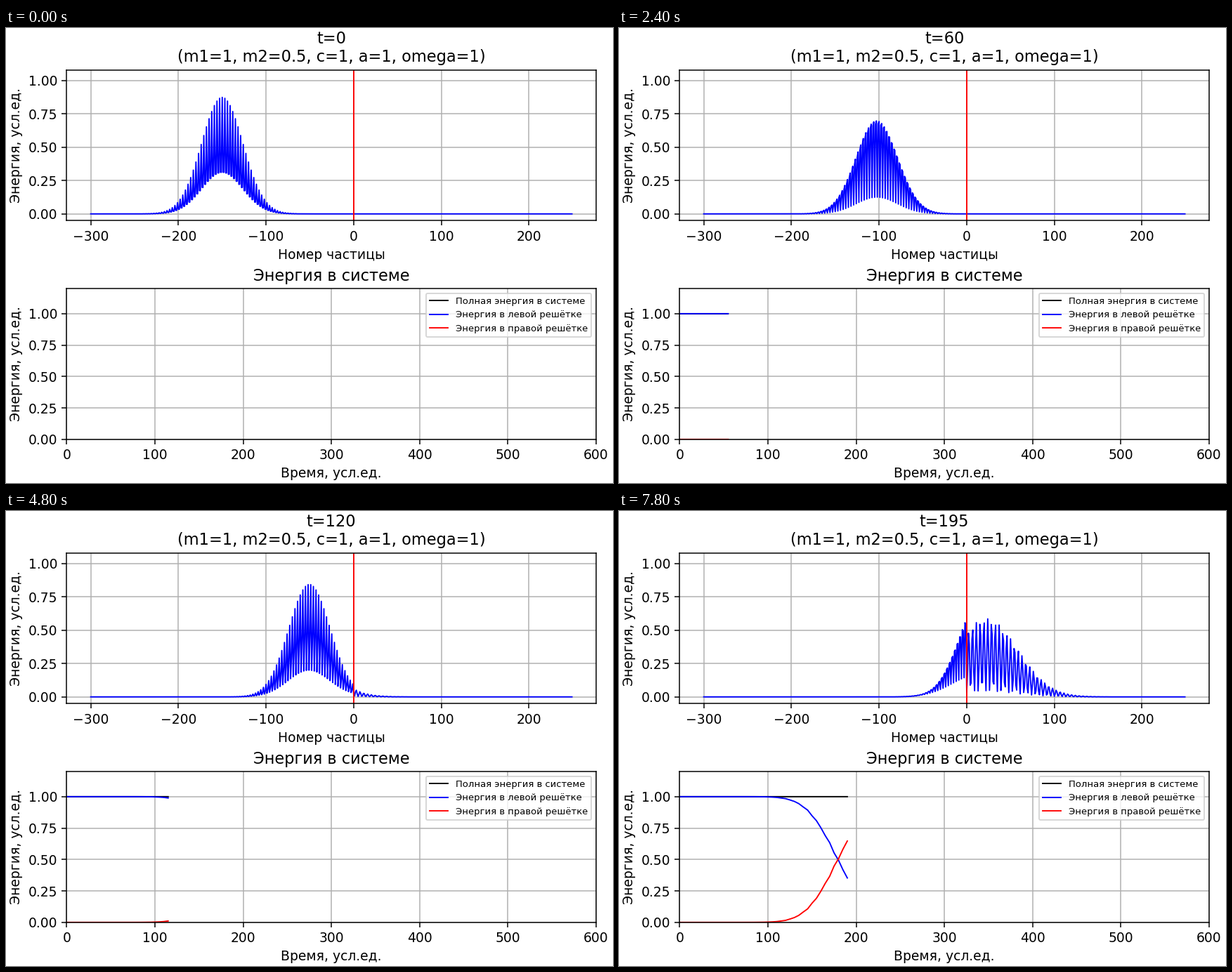
Recreate the animation shown at these times as a matplotlib script. Size 864 by 648 pixels, loop 8 s.

```python
import numpy as np
import matplotlib.pyplot as plt
from matplotlib.animation import FuncAnimation

# Wave packet in a harmonic chain of two lattices joined at n = 0
M1, M2, C, OMEGA = 1.0, 0.5, 1.0, 1.0
BETA, N0 = 0.03, -150
FRAMES, STEP, DT = 40, 5, 0.02

n = np.arange(-300, 250)
mass = np.where(n < 0, M1, M2)


def stretch(u):
    """Spring elongations, with fixed walls at both ends."""
    return np.diff(u, prepend=0.0, append=0.0)


def energy(u, v):
    """Energy per particle: kinetic plus half of both neighbour springs."""
    spring = C * stretch(u) ** 2 / 4
    return mass * v ** 2 / 2 + spring[:-1] + spring[1:]


def simulate():
    k = 2 * np.arcsin(OMEGA / 2 * np.sqrt(M1 / C))
    speed = np.sqrt(C / M1) * np.cos(k / 2)
    x = n - N0
    env = np.exp(-(BETA * x) ** 2 / 2)
    u = env * np.sin(k * n)
    v = -env * (OMEGA * np.cos(k * n) - BETA ** 2 * speed * x * np.sin(k * n))

    states = [energy(u, v)]
    acc = C * np.diff(stretch(u)) / mass
    for _ in range(FRAMES - 1):
        for _ in range(round(STEP / DT)):
            v = v + acc * DT / 2
            u = u + v * DT
            acc = C * np.diff(stretch(u)) / mass
            v = v + acc * DT / 2
        states.append(energy(u, v))
    return np.array(states)


states = simulate()
total = states.sum(axis=1)
left = states[:, n < 0].sum(axis=1) / total[0]
right = states[:, n >= 0].sum(axis=1) / total[0]
total = total / total[0]

fig, (top, low) = plt.subplots(2, 1, figsize=(6.4, 4.8), dpi=135)
fig.subplots_adjust(left=0.1, right=0.972, bottom=0.096, top=0.908, hspace=0.45)

chain, = top.plot(n, states[0], "b", lw=1)
top.axvline(0, color="r", lw=1)
top.set_xlim(-327.45, 276.45)
top.set_ylim(-0.051, 1.081)
top.set_xlabel("Номер частицы")

curves = [
    (low.plot([], [], color, lw=1, label=label)[0], data)
    for color, label, data in (
        ("k", "Полная энергия в системе", total),
        ("b", "Энергия в левой решётке", left),
        ("r", "Энергия в правой решётке", right),
    )
]
low.set_xlim(0, 600)
low.set_ylim(0, 1.2)
low.set_yticks(np.arange(0, 1.01, 0.25))
low.set_title("Энергия в системе")
low.set_xlabel("Время, усл.ед.")
low.legend(loc="upper right", fontsize=7)

for ax in (top, low):
    ax.set_ylabel("Энергия, усл.ед.")
    ax.grid(True)


def update(i):
    top.set_title(f"t={i * STEP}\n(m1=1, m2=0.5, c=1, a=1, omega=1)")
    # the chain trails the counter by one step, the energy curves by two
    chain.set_ydata(states[max(i - 1, 0)])
    idx = np.arange(i)
    for line, data in curves:
        line.set_data(idx * STEP, data[np.maximum(idx - 1, 0)])
    return [chain] + [line for line, _ in curves]


anim = FuncAnimation(fig, update, frames=FRAMES, interval=200,
                     init_func=lambda: update(0), repeat=True, repeat_delay=0)
plt.show()
```
